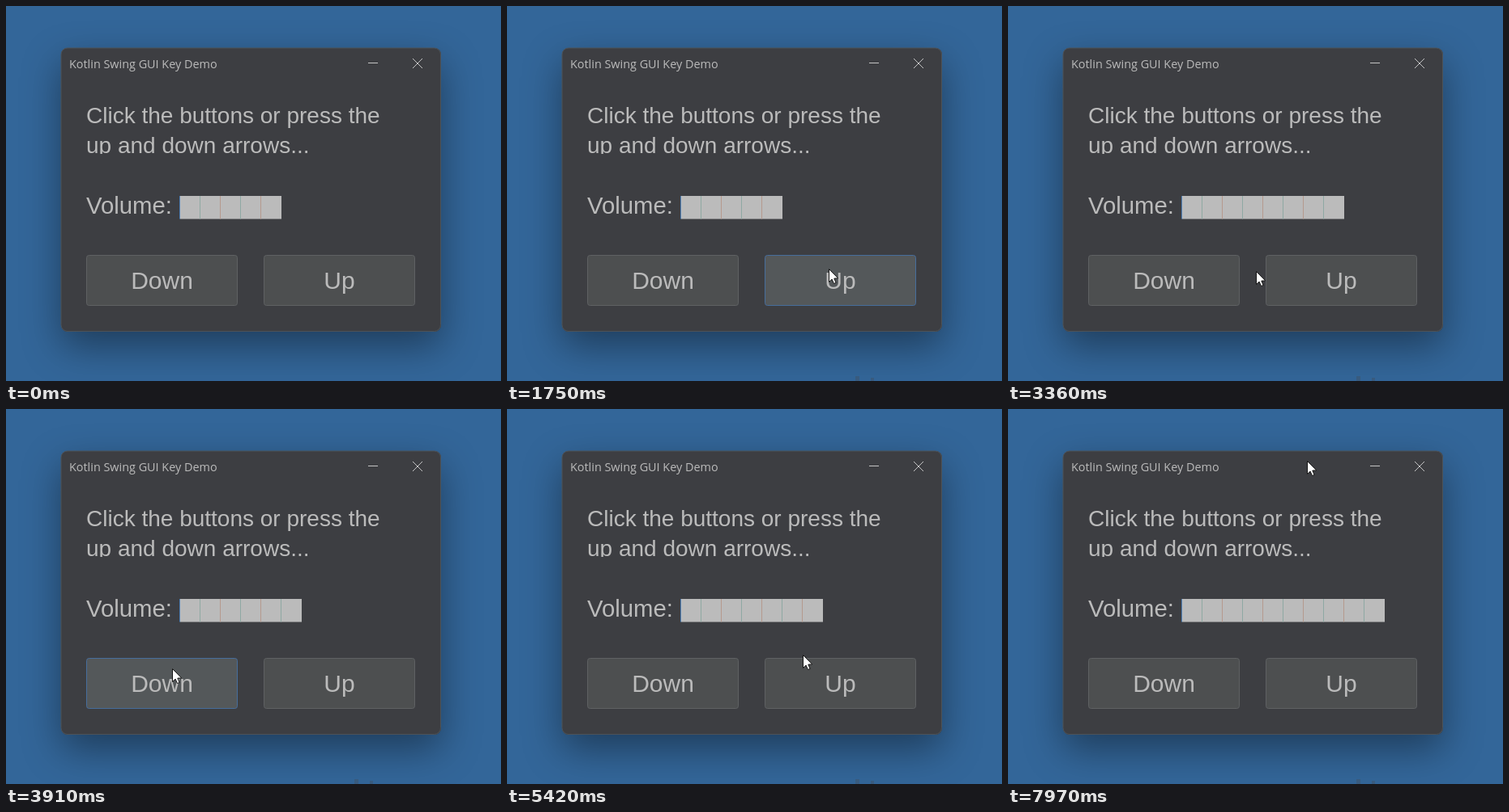
An HTML page with a canvas that plays this animation: 611 by 464 pixels, repeating every 8000 ms.

```html
<!DOCTYPE html>
<html lang="en">
<head>
<meta charset="utf-8">
<title>Key Demo</title>
<style>
html, body { margin: 0; width: 100%; height: 100%; overflow: hidden; background: #336699; }
canvas { display: block; }
</style>
</head>
<body>
<canvas id="stage" width="611" height="464"></canvas>
<script>
const ctx = document.getElementById('stage').getContext('2d');
const LOOP = 8000;
const SANS = '"Liberation Sans", Arial, sans-serif';
const TITLE = '"Open Sans", "Noto Sans", sans-serif';
const TEXT = '#bbbbbb';

const ENTER = 860;
const ORIGIN = [446, 462];
// start, steps, step length, x, y
const moves = [
  [860, 5, 70, 386, 434],
  [1470, 5, 70, 397, 325],
  [2010, 2, 70, 407, 334],
  [3160, 6, 78, 205, 321],
  [4320, 5, 70, 364, 332],
  [5280, 10, 76.6, 369, 64]
];
// mouse down, mouse up
const clicks = [
  [2480, 2550], [2680, 2820], [3020, 3160], [3630, 3700], [3770, 3910],
  [3980, 4120], [4740, 4880], [4940, 5010], [6100, 6170]
];
const volumeUp = [2550, 2740, 3090, 4810, 4940, 7570, 7770, 7970];
const volumeDown = [3700, 3840, 4050];
const buttons = [{ x: 99, label: 'Down' }, { x: 318, label: 'Up' }];

const smooth = p => p * p * (3 - 2 * p);
const passed = (times, t) => times.filter(v => t >= v).length;

function pointerAt(t) {
  let [x, y] = ORIGIN;
  for (const [start, steps, len, tx, ty] of moves) {
    if (t < start) break;
    const k = Math.min(steps, Math.floor((t - start) / len) + 1);
    const p = smooth(k / steps);
    x += (tx - x) * p;
    y += (ty - y) * p;
  }
  return [Math.round(x), Math.round(y)];
}

function box(x, y, w, h, r) {
  ctx.beginPath();
  ctx.roundRect(x, y, w, h, r);
}

function text(str, x, y, size, family = SANS, align = 'left') {
  ctx.font = size + 'px ' + family;
  ctx.textAlign = align;
  ctx.fillStyle = TEXT;
  ctx.fillText(str, x, y);
}

function line(x1, y1, x2, y2) {
  ctx.beginPath();
  ctx.moveTo(x1, y1);
  ctx.lineTo(x2, y2);
  ctx.stroke();
}

function drawWindow() {
  ctx.fillStyle = '#336699';
  ctx.fillRect(0, 0, 611, 464);
  ctx.save();
  ctx.shadowColor = 'rgba(0,0,0,.4)';
  ctx.shadowBlur = 48;
  ctx.shadowOffsetY = 18;
  ctx.fillStyle = '#3d3e42';
  box(68, 52, 469, 351, 8);
  ctx.fill();
  ctx.restore();
  ctx.lineWidth = 1;
  ctx.strokeStyle = '#4d5257';
  box(68, 52, 468.5, 350.5, 8);
  ctx.stroke();

  text('Kotlin Swing GUI Key Demo', 78, 77, 14.4, TITLE);
  ctx.strokeStyle = '#c4c4c4';
  line(447, 70.5, 459, 70.5);
  line(502, 65, 514, 77);
  line(514, 65, 502, 77);

  ctx.save();
  box(99, 110, 410, 73, 0);
  ctx.clip();
  text('Click the buttons or press the', 99, 145, 28);
  text('up and down arrows...', 99, 182, 28);
  ctx.restore();
}

function drawVolume(level) {
  text('Volume:', 99, 257, 29.33);
  ctx.fillStyle = TEXT;
  ctx.fillRect(215, 235, level * 25, 28.5);
  for (let i = 0; i < level; i++) {
    ctx.fillStyle = i === 0 ? '#4f7fb5' : i % 2 ? '#8fa9a3' : '#b59a8e';
    ctx.fillRect(214 + i * 25, 235, 1, 28.5);
  }
}

function drawButton({ x, label }, px, py, down) {
  const hover = px >= x && px < x + 187 && py >= 308 && py < 371;
  ctx.fillStyle = !hover ? '#4d4f50' : down ? '#5d5f62' : '#54585a';
  ctx.strokeStyle = hover ? '#466d9c' : '#5f6163';
  ctx.lineWidth = 1;
  box(x + .5, 308.5, 186, 62, 3);
  ctx.fill();
  ctx.stroke();
  text(label, x + 93.5, 350, 30, SANS, 'center');
}

function drawTrail() {
  ctx.fillStyle = 'rgba(62,84,108,.55)';
  ctx.fillRect(430, 458, 5, 6);
  ctx.fillRect(449, 460, 4, 4);
}

function drawPointer(x, y, down) {
  if (down) {
    ctx.fillStyle = 'rgba(220,220,20,.6)';
    ctx.beginPath();
    ctx.arc(x, y, 15, 0, Math.PI * 2);
    ctx.fill();
  }
  ctx.save();
  ctx.translate(x + .5, y + .5);
  ctx.beginPath();
  ctx.moveTo(0, 0);
  ctx.lineTo(0, 16);
  ctx.lineTo(3.6, 12.6);
  ctx.lineTo(6, 18);
  ctx.lineTo(8.6, 17);
  ctx.lineTo(6.3, 11.6);
  ctx.lineTo(11.2, 11.4);
  ctx.closePath();
  ctx.fillStyle = down ? '#fdfda8' : '#ffffff';
  ctx.fill();
  ctx.strokeStyle = '#151515';
  ctx.lineWidth = 1;
  ctx.stroke();
  ctx.restore();
}

function draw(t) {
  const shown = t >= ENTER;
  const [px, py] = pointerAt(t);
  const down = clicks.some(([a, b]) => t >= a && t < b);
  drawWindow();
  drawVolume(5 + passed(volumeUp, t) - passed(volumeDown, t));
  buttons.forEach(b => drawButton(b, px, py, down));
  if (shown) {
    drawTrail();
    drawPointer(px, py, down);
  }
}

const begin = performance.now();
function tick() {
  draw((performance.now() - begin) % LOOP);
  requestAnimationFrame(tick);
}
tick();
</script>
</body>
</html>
```
